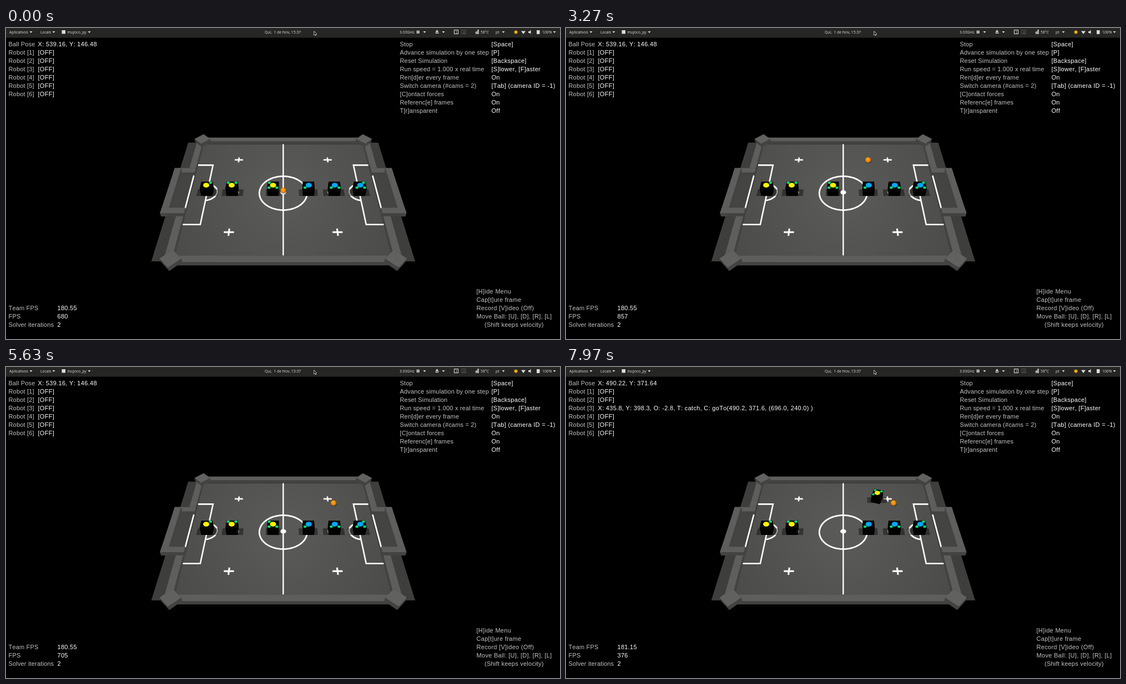
Recreate the animation shown at these times as an HTML page with a canvas. Size 998 by 561 pixels, loop 8000 ms.

```html
<!DOCTYPE html>
<html lang="pt">
<head>
<meta charset="utf-8">
<title>Robot soccer simulation</title>
<style>
html, body { margin: 0; width: 100%; height: 100%; overflow: hidden; background: #000; }
canvas { display: block; }
</style>
</head>
<body>
<canvas id="stage" width="998" height="561"></canvas>
<script>
const g = document.getElementById('stage').getContext('2d');
const W = 998, H = 561, LOOP = 8000, FRAME = 100 / 3;
const YELLOW = '#fff200', BLUE = '#00a8ff', GREEN = '#00e070';
const LABEL = '#c2c2c2', VALUE = '#fff', INK = '#dcdcdc';
const WALL_TOP = '#5e5e5c', WALL_SIDE = '#434341';

// Field units: origin at the centre spot, x right, z towards the viewer, h up.
const HALF_X = 166, HALF_Z = 142, WALL = 12, WALL_H = 8, GOAL_Z = 57, GOAL_X = 206;
const TILT = 0.709, DEPTH = 0.001108;

const scaleAt = (z, h = 0) => 1 / (1 - DEPTH * (z + h));
function project(x, z, h = 0) {
  const s = scaleAt(z, h);
  return [499.4 + x * s, 296.5 + TILT * (z - h) * s];
}

// Reported pose to field units.
const fromPose = (X, Y) => [(X - 320) / 1.747, (240 - Y) / 1.81];

// Keys are [frame, ...values].
const BALL_END = [490.22, 371.64];
const ballKeys = [[38, 0, 0], [72, 1, -85], [121, 91, -85], [140, 97, -85], [160, ...fromPose(...BALL_END)]];
const fpsKeys = [[0, 680], [34, 708], [73, 944], [121, 777], [169, 705], [200, 433], [239, 376]];
const START = 171;
const robotKeys = [[START, 288.6, 240, 1.57], [200, 303, 286.8, 1.8], [225, 358, 374, 2.75], [239, 435.8, 398.3, 3.48]];

// Linear, or a smooth curve through the keys that starts at rest.
function sample(keys, n, smooth) {
  const last = keys.length - 1;
  if (n <= keys[0][0]) return keys[0].slice(1);
  if (n >= keys[last][0]) return keys[last].slice(1);
  const i = keys.findIndex(k => k[0] > n) - 1;
  const a = keys[i], b = keys[i + 1], span = b[0] - a[0], u = (n - a[0]) / span;
  const slope = (j, c) => {
    if (j === 0) return 0;
    const p = keys[j - 1], q = keys[Math.min(j + 1, last)];
    return (q[c] - p[c]) / (q[0] - p[0]) * span;
  };
  return a.slice(1).map((v, k) => {
    const d = b[k + 1] - v;
    if (!smooth) return v + d * u;
    const m0 = slope(i, k + 1), m1 = slope(i + 1, k + 1);
    return v + u * (m0 + u * (3 * d - 2 * m0 - m1 + u * (m0 + m1 - 2 * d)));
  });
}

function trace(points) {
  g.beginPath();
  points.forEach(p => g.lineTo(...p));
}

function fill(color, points) {
  g.fillStyle = color;
  trace(points);
  g.fill();
}

function oval(color, x, y, rx, ry = rx) {
  g.fillStyle = color;
  g.beginPath();
  g.ellipse(x, y, rx, ry, 0, 0, 7);
  g.fill();
}

const rect = (x1, x2, z1, z2) => [[x1, z1], [x2, z1], [x2, z2], [x1, z2]];
const plate = (color, base) => fill(color, base.map(p => project(...p)));

function prism(base, h, top = WALL_TOP, side = WALL_SIDE) {
  const low = base.map(p => project(...p)), high = base.map(p => project(...p, h));
  low.forEach((p, i) => {
    const j = (i + 1) % low.length;
    fill(side, [p, low[j], high[j], high[i]]);
  });
  fill(top, high);
}

function mark(...points) {
  g.strokeStyle = '#fff';
  g.lineWidth = 2.8 * scaleAt(points[0][1]);
  trace(points.map(p => project(...p)));
  g.stroke();
}

function arc(cx, r, from, to) {
  const steps = 48;
  mark(...Array.from({ length: steps + 1 }, (_, i) => {
    const a = from + (to - from) * i / steps;
    return [cx + r * Math.cos(a), r * Math.sin(a)];
  }));
}

function spot(x, r) {
  const [px, py] = project(x, 0);
  oval('#fff', px, py, r, r * 0.75);
}

function fieldSide(side) {
  const box = (x1, x2, z1, z2) => prism(rect(side * x1, side * x2, z1, z2), WALL_H);
  const outer = HALF_X + WALL, end = HALF_Z + WALL;
  for (const z of [-1, 1]) plate('#3e3e3d', rect(side * HALF_X, side * 199, z * GOAL_Z, z * 147));
  plate('#444443', rect(side * HALF_X, side * GOAL_X, -GOAL_Z, GOAL_Z));
  box(HALF_X, outer, -end, -GOAL_Z);
  box(HALF_X, GOAL_X, -GOAL_Z, WALL - GOAL_Z);
  box(GOAL_X - WALL, GOAL_X, -GOAL_Z, GOAL_Z);
  mark([side * 169, WALL - GOAL_Z], [side * 169, GOAL_Z - WALL]);
  box(HALF_X, outer, GOAL_Z, end);
  box(HALF_X, GOAL_X, GOAL_Z - WALL, GOAL_Z);

  mark([side * HALF_X, -75], [side * 137, -75], [side * 137, 75], [side * HALF_X, 75]);
  const facing = side < 0 ? 0 : Math.PI;
  arc(side * 139, 20, facing - 1.45, facing + 1.45);
  spot(side * 83, 3.6);
  for (const z of [-91, 91]) {
    mark([side * 88 - 8.2, z], [side * 88 + 8.2, z]);
    mark([side * 88, z - 7.5], [side * 88, z + 7.5]);
  }
}

function corner(x, z) {
  prism([[x - 16, z], [x, z - 16], [x + 16, z], [x, z + 16]], WALL_H + 1, '#616160');
}

function field() {
  const shade = g.createRadialGradient(499, 300, 30, 499, 300, 235);
  shade.addColorStop(0, '#595957');
  shade.addColorStop(1, '#4a4a48');
  plate(shade, rect(-HALF_X, HALF_X, -HALF_Z, HALF_Z));
  const end = HALF_Z + WALL;
  prism(rect(-HALF_X, HALF_X, -end, -HALF_Z), WALL_H);
  [-1, 1].forEach(fieldSide);
  mark([0, -HALF_Z], [0, HALF_Z]);
  arc(0, 43, 0, 2 * Math.PI);
  spot(0, 5.3);
  prism(rect(-HALF_X, HALF_X, HALF_Z, end), WALL_H);
  for (const z of [-148, 148]) for (const x of [-168, 168]) corner(x, z);
}

// tags are the corners of the lid that carry a green dot.
function robot(x, z, color, tags, turn = 0) {
  const cos = Math.cos(turn), sin = Math.sin(turn), height = 18;
  const at = (u, v) => [x + u * cos - v * sin, z + u * sin + v * cos];
  const reach = Math.min(19, 11 + Math.abs(x) * 0.13);
  plate('rgba(0,0,0,.4)', rect(x - reach, x + reach, z - 8, z + 9));
  prism(rect(-10, 10, -9, 9).map(p => at(...p)), height, '#070707', '#020202');
  const s = scaleAt(z, height);
  const dot = (c, u, v, r) => oval(c, ...project(...at(u, v), height), r * s, r * s * 0.78);
  dot(color, 0, 0, 5.4);
  for (const [u, v] of tags) dot(GREEN, u * 6.8, v * 6.3, 2.7);
}

function ball(x, z) {
  const [px, py] = project(x, z, 5);
  oval('rgba(0,0,0,.3)', px + 1, py + 3, 5, 3);
  const skin = g.createRadialGradient(px - 1, py - 2, 0.5, px, py, 5.2);
  skin.addColorStop(0, '#ffae25');
  skin.addColorStop(0.6, '#f78d00');
  skin.addColorStop(1, '#b85f00');
  oval(skin, px, py, 5);
}

function text(s, x, y, color, spacing = 0.3) {
  g.letterSpacing = spacing + 'px';
  g.fillStyle = color;
  g.fillText(s, x, y);
}

function frameBox(x, label, color) {
  g.strokeStyle = color;
  g.lineWidth = 1;
  g.strokeRect(x - 3.5, 3.5, 7, 7);
  text(label, x - 1.8, 9.5, color, 0);
}

function topBar() {
  const bar = (color, x, y, w, h) => { g.fillStyle = color; g.fillRect(x, y, w, h); };
  const down = (x, y, r, h) => fill(INK, [[x - r, y], [x + r, y], [x, y + h]]);
  bar('#262625', 0, 0, W, 17.5);
  g.font = '6.8px "Open Sans", sans-serif';
  for (const [s, x] of [['Aplicativos', 6], ['Locais', 62], ['mujoco_py', 110.5], ['Qui,\u00a0 1 de Nov, 15:37', 466],
    ['3.03GHz', 709], ['58°C', 855], ['pt', 882], ['100%', 966]]) text(s, x, 9.5, INK, 0);
  for (const x of [45, 86, 150, 754, 788, 896, 988]) down(x, 6, 2.5, 3);
  bar(INK, 100.5, 4, 6.5, 6.5);
  bar('#aaa', 739.5, 4.5, 5.5, 5.5);
  down(776.5, 7.3, 3, -4);
  bar(INK, 773.5, 8.3, 6, 1.5);
  frameBox(811, '1', INK);
  frameBox(824.5, 'A', '#555');
  oval('#aaa', 848, 8.5, 2.5);
  bar('#aaa', 849, 3, 3, 8);
  oval('#f7a900', 918.5, 7.5, 3);
  down(932, 5.5, 4, 5.5);
  bar(INK, 941, 6, 2.5, 3);
  fill(INK, [[942, 7.3], [945.5, 3.5], [945.5, 11]]);
  bar(INK, 956, 4, 5.5, 7);
  // pointer
  trace([[554.8, 5.7], [554.8, 13], [556.7, 11.7], [558.3, 14], [557.8, 11.2], [559.8, 11]]);
  g.closePath();
  g.fillStyle = '#080808';
  g.strokeStyle = '#eee';
  g.lineWidth = 0.8;
  g.fill();
  g.stroke();
}

const menu = [['Stop', '[Space]'], ['Advance simulation by one step', '[P]'], ['Reset Simulation', '[Backspace]'],
  ['Run speed = 1.000 x real time', '[S]lower, [F]aster'], ['Ren[d]er every frame', 'On'],
  ['Switch camera (#cams = 2)', '[Tab] (camera ID = -1)'], ['[C]ontact forces', 'On'],
  ['Referenc[e] frames', 'On'], ['T[r]ansparent', 'Off']];
const help = ['[H]ide Menu', 'Cap[t]ure frame', 'Record [V]ideo (Off)', 'Move Ball: [U], [D], [R], [L]'];

function table(rows, x1, x2, y) {
  rows.forEach(([label, value], i) => {
    text(label, x1, y + i * 15, LABEL, 0.17);
    text(value, x2, y + i * 15, VALUE);
  });
}

function overlay(n, [X, Y, angle]) {
  g.font = '11px "Liberation Sans", Arial, sans-serif';
  const active = n >= START;
  const O = angle > Math.PI ? angle - 2 * Math.PI : angle;
  const [bx, by] = active ? BALL_END : [539.16, 146.48];
  const pose = [X, Y, O].map((v, i) => `${'XYO'[i]}: ${v.toFixed(1)}`).join(', ');
  const status = `${pose}, T: catch, C: goTo(490.2, 371.6, (696.0, 240.0) )`;
  const robots = [1, 2, 3, 4, 5, 6].map(i => [`Robot [${i}]`, i === 3 && active ? status : '[OFF]']);
  table([['Ball Pose', `X: ${bx}, Y: ${by}`], ...robots], 4.5, 57.5, 32.5);
  table(menu, 709.5, 874.5, 32.5);
  const teamFps = !active ? '180.55' : n < 203 ? '5.61' : '181.15';
  const fps = Math.round(sample(fpsKeys, n)[0]);
  table([['Team FPS', teamFps], ['FPS', fps], ['Solver iterations', '2']], 4.5, 92.5, 508.5);
  help.forEach((s, i) => text(s, 847.5, 478.5 + i * 15, LABEL));
  text('(Shift keeps velocity)', 862, 538.5, LABEL, 0.24);
}

function draw(time) {
  const n = Math.floor((time % LOOP + 3.4) / FRAME);
  const pose = sample(robotKeys, n, true);
  const backLeft = [-1, -1], backRight = [1, -1], frontLeft = [-1, 1], frontRight = [1, 1];
  g.fillStyle = '#000';
  g.fillRect(0, 0, W, H);
  g.fontKerning = 'none';
  field();
  robot(...fromPose(pose[0], pose[1]), YELLOW, [backLeft, frontLeft, frontRight], pose[2] - 1.57);
  robot(-136, 0, YELLOW, [backRight]);
  robot(-91, 0, YELLOW, [backLeft, backRight]);
  robot(45, 0, BLUE, [frontLeft]);
  robot(91, 0, BLUE, [frontLeft, frontRight]);
  robot(136, 0, BLUE, [frontLeft, frontRight, backRight]);
  ball(...sample(ballKeys, n));
  topBar();
  overlay(n, pose);
}

const start = performance.now();
function tick() {
  draw(performance.now() - start);
  requestAnimationFrame(tick);
}
tick();
</script>
</body>
</html>
```
